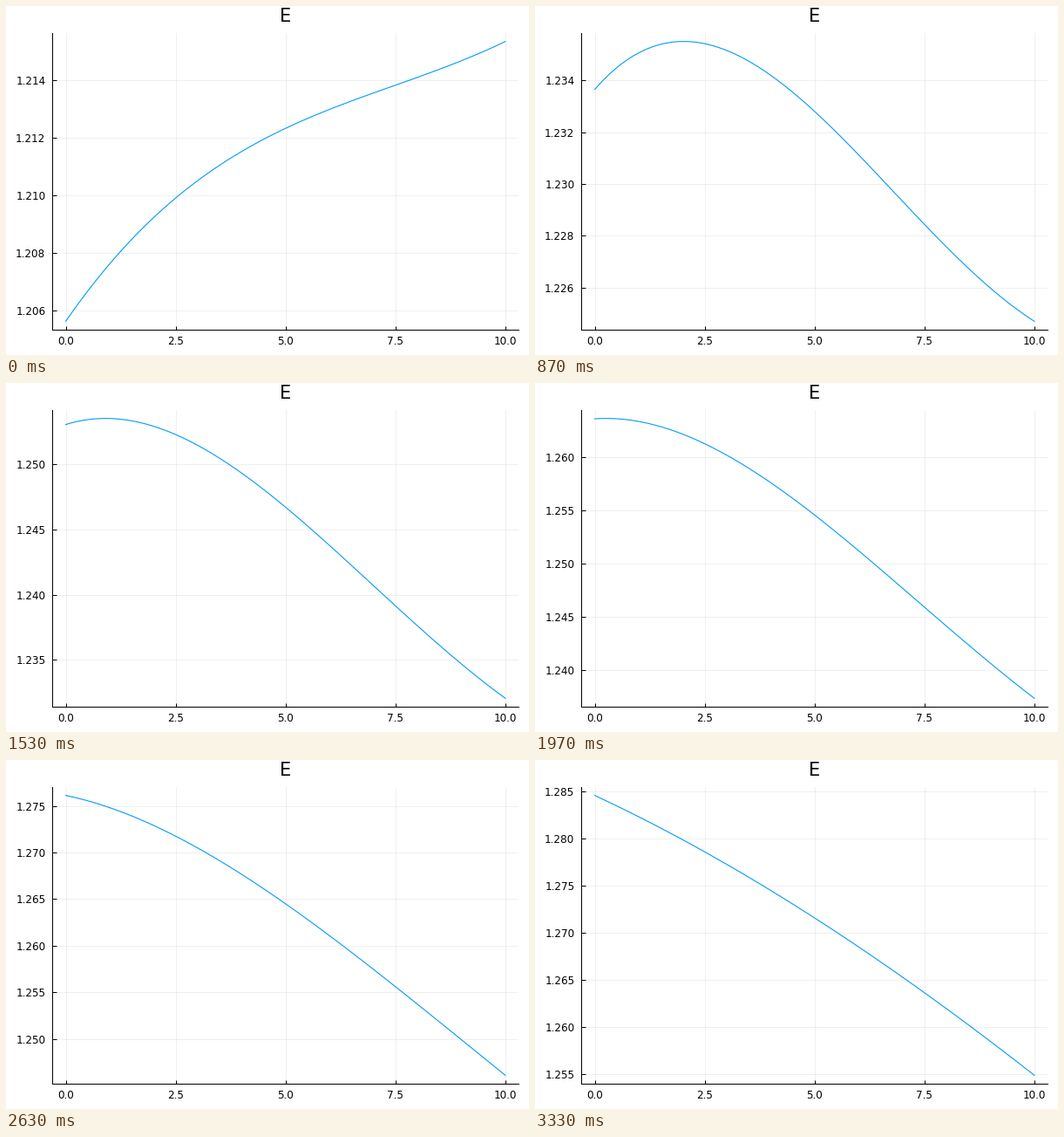
These frames come from a looping animation (600x400 px, 3360 ms). A matplotlib script:

```python
import numpy as np
import matplotlib.pyplot as plt
from matplotlib.animation import FuncAnimation

W, H, DPI = 600, 400, 100
FRAMES, LOOP_MS = 101, 3360
PX = 72 / DPI  # one pixel in points

LEFT, RIGHT, TOP, BOTTOM = 53.4, 588, 31, 371
CHAR_W = 7.8   # left margin gained per label character

# Step mantissas with their niceness
NICE = [(1, 1.0), (5, 0.9), (2.5, 0.5), (2, 0.7), (3, 0.2)]

x = np.linspace(0, 10, 101)
v = x / 5 - 1


def field(s):
    """E over x at progress s: a quartic in x whose parts drift smoothly."""
    level = 12340 + s * (82600 - s * (11900 + 11500 * s))
    slope = 4860 - s * (33952 + s * (22405 - s * (64150 - 27500 * s)))
    bend = -1842 - s * (9300 - 9290 * s)
    skew = -470 - s * (4182 - s * (3200 + s * (6400 - 5000 * s)))
    bulge = 170 * s * (1 - s)
    y = level + slope * v + bend * v**2
    y += skew * (v - v**3) / 0.375 + bulge * (v**2 - v**4) / 0.1875
    return 1.2 + y * 1e-6


def best_ticks(lo, hi):
    """Pick 4 to 8 ticks by granularity, coverage and niceness."""
    best, ticks, digits = -1, [], 3
    for power in (2, 3, 4):
        for q, nice in NICE:
            gap = q * 10.0 ** -power
            first, last = int(np.ceil(lo / gap)), int(np.floor(hi / gap))
            n = last - first + 1
            if not 4 <= n <= 8:
                continue
            grain = 1 - abs(n - 5) / 5
            cover = 1.5 * (hi - lo) / ((n - 1) * gap)
            score = grain / 4 + cover / 3 + nice / 4
            if score > best + 1e-9:
                best = score
                ticks = np.arange(first, last + 1) * gap
                digits = power + (q == 2.5)
    return ticks, digits


plt.rcParams["font.family"] = "DejaVu Sans"
fig = plt.figure(figsize=(W / DPI, H / DPI), dpi=DPI, facecolor="white")
ax = fig.add_axes([0.1, 0.1, 0.8, 0.8])
ax.set_axisbelow(True)
ax.spines[["top", "right"]].set_visible(False)
ax.spines[["left", "bottom"]].set_linewidth(PX)
ax.tick_params(direction="in", length=4.5 * PX, width=PX, labelsize=12 * PX)
ax.tick_params(axis="x", pad=7 * PX)
ax.tick_params(axis="y", pad=8 * PX)
ax.grid(color="black", alpha=0.06, linewidth=PX)
ax.set_title("E", fontsize=21 * PX, pad=13.2 * PX)
ax.set_xlim(-0.3, 10.3)
x_ticks = np.arange(0, 10.1, 2.5)
ax.set_xticks(x_ticks, [f"{t:.1f}" for t in x_ticks])
line, = ax.plot(x, x, color="#009afa", linewidth=1.1 * PX)


def draw(step):
    y = field(step / (FRAMES - 1))
    pad = 0.03 * np.ptp(y)
    lo, hi = y.min() - pad, y.max() + pad
    ticks, digits = best_ticks(lo, hi)
    left = LEFT + CHAR_W * (digits - 3)
    ax.set_position([left / W, 1 - BOTTOM / H,
                     (RIGHT - left) / W, (BOTTOM - TOP) / H])
    ax.set_yticks(ticks, [f"{t:.{digits}f}" for t in ticks])
    ax.set_ylim(lo, hi)
    line.set_ydata(y)
    return [line]


anim = FuncAnimation(fig, draw, frames=FRAMES, interval=LOOP_MS / FRAMES,
                     repeat=True, repeat_delay=0, blit=False)
plt.show()
```
